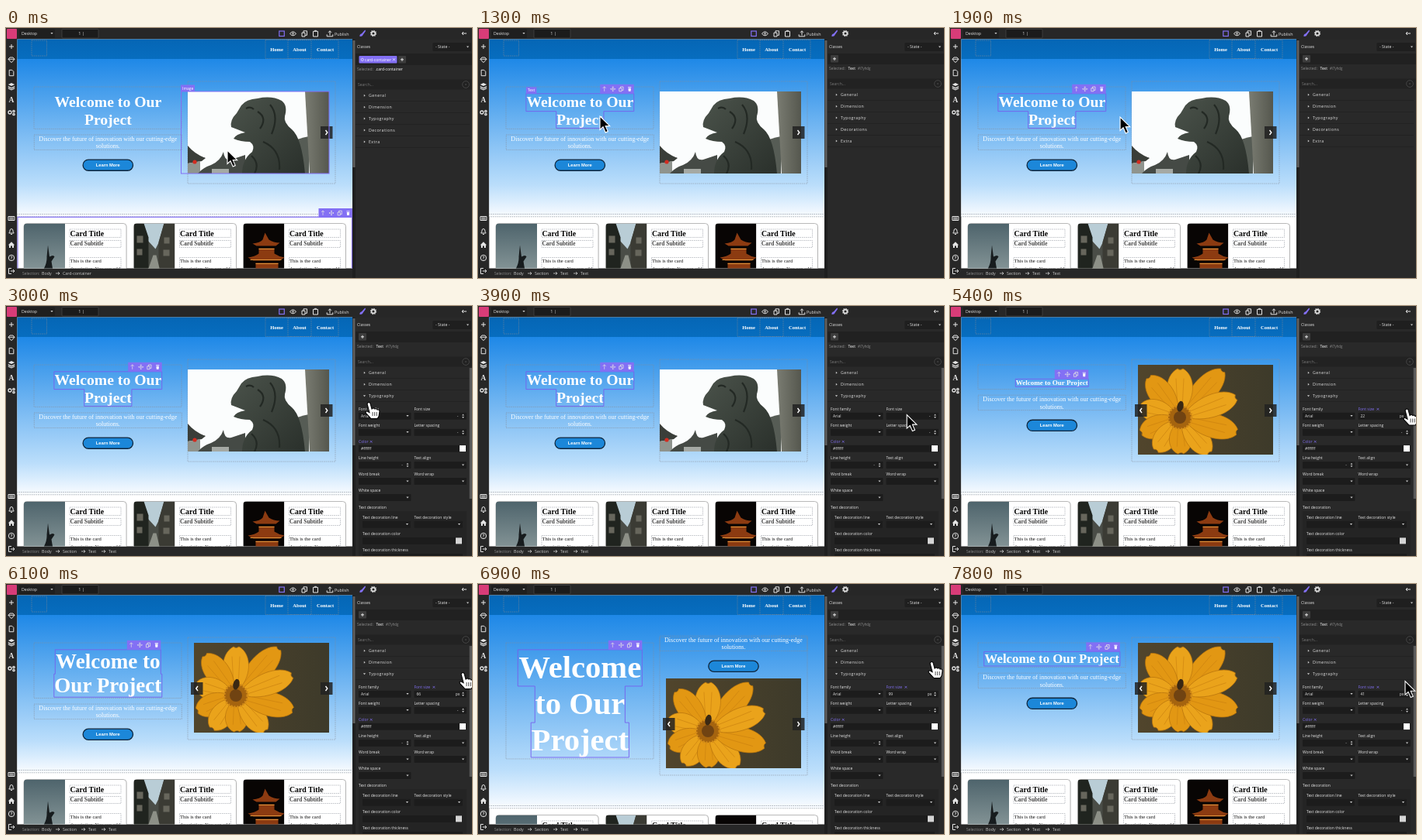
These frames come from a looping animation (600x323 px, 7.9 s). An HTML page:

```html
<!DOCTYPE html>
<html lang="en">
<head>
<meta charset="utf-8">
<title>Page builder</title>
<style>
html, body { margin: 0; width: 100%; height: 100%; overflow: hidden; background: #272727; }
svg { display: block; width: 600px; height: 323px; font-family: "Open Sans", "Noto Sans", sans-serif; }
.serif { font-family: "Liberation Serif", "Times New Roman", serif; }
.arial { font-family: "Liberation Sans", Arial, sans-serif; }
.b { font-weight: bold; }
.m { text-anchor: middle; }
.dash { fill: none; stroke: #868d96; stroke-opacity: .75; stroke-width: .7; stroke-dasharray: 1.6 1; }
.icon { fill: none; stroke: #e4e4e4; stroke-width: 1; stroke-linejoin: round; }
.acc { letter-spacing: .45px; font-weight: 500; }
</style>
</head>
<body>
<svg id="stage" viewBox="0 0 600 323"></svg>
<script>
const LOOP = 7900, STEP = 100, SELECT = 700, OPEN = 2700, DRAG = 4950, SLIDE = 5300;
const PURPLE = '#8370f4', LIGHT = '#e4e4e4', GREY = '#8b8b8b';
const SCALE = .41, BASE = 48 * SCALE, COLUMN = 190, TOP = 84.7;
const EMS = { Welcome: 3.943, to: .833, Our: 1.778, Project: 3.109 };

// Pointer stops: time, x, y
const STOPS = [
  [0, 285, 158], [100, 285, 158], [600, 157, 114], [1700, 157, 114], [2400, 470, 119],
  [2800, 467, 125], [3300, 467, 125], [4200, 582, 146], [4600, 596, 150], [4800, 596, 150],
  [DRAG, 588, 143], [6100, 588, 115], [6800, 584, 101], [6900, 584, 101],
  [7700, 586, 125.6], [LOOP, 586, 125.6]
];

const rect = (x, y, w, h, fill, more = '') =>
  `<rect x="${x}" y="${y}" width="${w}" height="${h}" fill="${fill}" ${more}/>`;
const dash = (x, y, w, h) => `<rect class="dash" x="${x}" y="${y}" width="${w}" height="${h}"/>`;
const path = (d, fill, more = '') => `<path d="${d}" fill="${fill}" ${more}/>`;
const icon = (d, x, y, more = '') => `<path class="icon" d="${d}" transform="translate(${x} ${y})" ${more}/>`;
const text = (x, y, s, size = 5, fill = LIGHT, cls = '') =>
  `<text x="${x}" y="${y}" font-size="${size}" fill="${fill}" class="${cls}">${s}</text>`;
const group = (x, y, body) => `<g transform="translate(${x} ${y})">${body}</g>`;
const down = (x, y) => path(`M${x - 1.6} ${y - .9}h3.2l-1.6 2z`, '#ccc');
const spin = (x, y) => path(`M${x - 1.4} ${y - .8}h2.8l-1.4-2zM${x - 1.4} ${y + .8}h2.8l-1.4 2z`, '#ccc');

const COPY = 'M-1 -1V-3.5H3.5V2H1.2M-3 -1.2H1V3.7H-3Z';
const MOVE = 'M-3 0H3M0 -3V3M-2 -1L-3 0L-2 1M2 -1L3 0L2 1M-1 -2L0 -3L1 -2M-1 2L0 3L1 2';
const THIN = 'style="stroke-width:.7"';

const DEFS = `<defs>
  <linearGradient id="sky" x2="0" y2="1"><stop stop-color="#1e88e7"/>
    <stop offset=".8" stop-color="#bbdefb"/><stop offset="1" stop-color="#fafcff"/></linearGradient>
  <linearGradient id="bar" x2="0" y2="1"><stop stop-color="#0566b5"/><stop offset="1" stop-color="#076dbf"/></linearGradient>
  <linearGradient id="stone" x2="1" y2="1"><stop stop-color="#4b534b"/><stop offset="1" stop-color="#2a302b"/></linearGradient>
  <linearGradient id="pillar"><stop stop-color="#7a7c72"/><stop offset="1" stop-color="#55574e"/></linearGradient>
  <linearGradient id="soil"><stop stop-color="#51452c"/><stop offset="1" stop-color="#3d3a2a"/></linearGradient>
  <linearGradient id="dusk" x2="0" y2="1"><stop stop-color="#4e646c"/><stop offset="1" stop-color="#8d9c9d"/></linearGradient>
  <clipPath id="page"><rect x="14.4" y="14.4" width="431.6" height="296.1"/></clipPath>
  <clipPath id="photo"><rect x="242" y="76" width="174" height="116"/></clipPath>
  <clipPath id="still"><rect x="234" y="82" width="182" height="106"/></clipPath>
  <clipPath id="thumb"><path d="M53 0H4Q0 0 0 4V70H53Z"/></clipPath>
</defs>`;

function pointer(t) {
  let i = 1;
  while (STOPS[i][0] < t) i++;
  const [t0, x0, y0] = STOPS[i - 1], [t1, x1, y1] = STOPS[i];
  let k = (t - t0) / (t1 - t0);
  k = k * k * (3 - 2 * k);
  return [x0 + (x1 - x0) * k, y0 + (y1 - y0) * k];
}

// Greedy line breaking, widths in em
function wrap(size) {
  const lines = [];
  for (const [word, em] of Object.entries(EMS)) {
    const last = lines[lines.length - 1];
    if (last && (last.em + .25 + em) * size <= COLUMN) {
      last.s += ' ' + word;
      last.em += .25 + em;
    } else lines.push({ s: word, em });
  }
  return lines;
}

function layout(value) {
  const size = value === null ? BASE : value * SCALE;
  const strut = Math.max(size, BASE), step = strut * 1.16;
  const lines = wrap(size);
  lines.forEach((l, i) => {
    const w = l.em * size;
    l.y = TOP + i * step + strut * .896;
    l.x0 = 131.3 - w / 2;
    l.x1 = 131.3 + w / 2;
    l.top = l.y - size * .891;
    l.end = l.y + size * .216;
  });
  const bottom = TOP + lines.length * step, split = lines.length > 2;
  return {
    size, lines, bottom, split,
    cx: split ? 329 : 131.3,
    py: split ? 75 : bottom + 15.6,
    shift: split ? 46 : Math.max(0, bottom - 149)
  };
}

function toolbar(right, bottom) {
  return group(right - 43.5, bottom - 12,
    rect(0, 0, 43.5, 12, PURPLE) +
    icon('M0 3V-3M-2 -1L0 -3L2 -1', 5.5, 6, THIN) +
    icon(MOVE, 16.5, 6, THIN) +
    group(27, 6, `<g transform="scale(.8)">${icon(COPY, 0, 0)}</g>`) +
    path('M35.9 3.4h4.2v.9h-4.2zM36.3 4.9h3.4l-.3 4h-2.8z', '#fff'));
}

const label = (x, bottom, w, s) =>
  rect(x, bottom - 8.5, w, 8.5, PURPLE) + text(x + 2, bottom - 2.3, s, 5, '#fff');

function statue() {
  return `<g clip-path="url(#still)">` + rect(234, 82, 182, 106, '#fbfdfd') +
    // Roofs behind the figure
    path('M234 152Q243 163 257 168L252 172L234 175Z', '#3a3e39') +
    path('M234 175L250 172V188H234Z', '#8f948e') +
    path('M247 188Q254 180 264 177Q276 172 280 160Q281 172 290 170L308 164V188Z', '#454a45') +
    path('M265 182h22v6h-22z', '#a5a9a4') +
    path('M364 150Q376 142 390 140V188H364Z', '#565c55') +
    path('M385 82H416V188H391Z', 'url(#pillar)') +
    path('M303 100Q309 92 324 91Q342 87 355 94Q363 100 359 114Q357 122 368 131Q381 142 385 188H304Q304 170 317 160Q321 152 314 147Q302 147 293 143Q296 137 308 135Q298 131 290 128Q288 119 297 110Z', 'url(#stone)') +
    path('M309 104Q315 101 319 105M324 108Q337 116 327 130M340 99Q352 113 342 137M331 147Q354 157 352 183M316 165Q327 175 320 188', 'none', 'stroke="#232924" stroke-width="2.2"') +
    '<circle cx="243" cy="173" r="2.6" fill="#d32c20"/></g>';
}

function flower() {
  // Petals: angle, length, half width
  const petals = [[-48, 82, 16], [-90, 63, 17], [-128, 66, 16], [-165, 53, 15], [158, 54, 15],
    [125, 53, 15], [88, 47, 15], [50, 60, 15], [14, 76, 16], [-20, 77, 15]];
  return `<g clip-path="url(#photo)">` + rect(242, 76, 174, 116, 'url(#soil)') +
    group(296, 144, petals.map(([a, l, w], i) =>
      `<g transform="rotate(${a})">` +
      path(`M4 0C${l * .35} ${-w * 1.25} ${l * .85} ${-w * 1.25} ${l} -3Q${l - 3} 0 ${l} 4C${l * .85} ${w * 1.25} ${l * .35} ${w * 1.25} 4 0Z`, i % 2 ? '#eaa31b' : '#e29713', 'stroke="#b9750d" stroke-width=".7"') +
      path(`M12 -3L${l * .8} -5M12 3L${l * .8} 5`, 'none', 'stroke="#c98010" stroke-width=".6"') + '</g>').join('') +
      '<circle r="15" fill="#a5640f"/><circle r="15" fill="none" stroke="#d58d18" stroke-width="3" stroke-dasharray="2 2"/>' +
      '<circle r="8" fill="#704312"/><ellipse cx="-3" cy="-14" rx="4" ry="7" fill="#3a2813" transform="rotate(14)"/>') + '</g>';
}

const THUMBS = [
  rect(0, 0, 53, 70, 'url(#dusk)') +
    path('M26 58Q30 50 29.5 43L31 28L33 43Q38 40 39.5 43L35.5 49L37 58L42 70H22Z', '#171c1e'),
  rect(0, 0, 53, 70, '#4a4d47') + path('M12 0H39L32 25L28 33L18 22Z', '#b9cdd6') +
    path('M0 0H13L19 18V58L0 66Z', '#20241f') + path('M53 0H39L32 24V58L53 66Z', '#3b3b34') +
    path('M19 58L25 41H29L36 70H10Z', '#8d9087') +
    path('M4 16h8v9H4zM4 33h7v8H4zM39 18h7v8h-7zM38 34h8v8h-8z', '#67665c'),
  rect(0, 0, 53, 70, '#080504') + group(0, 3,
    path('M28 9L33 18Q39 22 47 22L42 26H17L12 23Q22 22 25 18ZM20 29H40V36Q46 40 53 41L47 45H13L6 41Q15 40 20 36ZM16 48H45V55Q49 59 53 60V70H5V61Q12 60 16 55Z', '#8c3b11') +
    path('M20 30h20M16 49h29M9 44h40M9 63h44', 'none', 'stroke="#e0933a" stroke-width="1.1"'))
];

function card(x, i) {
  return group(x, 252.5,
    rect(.5, .6, 132, 80, '#777', 'rx="4" opacity=".25"') +
    rect(0, 0, 132, 80, '#fff', 'rx="4" stroke="#8a8a8a" stroke-width=".6"') +
    `<g clip-path="url(#thumb)">${THUMBS[i]}</g>` +
    dash(59, 7.5, 66, 10.5) + dash(59, 22, 66, 9) + dash(59, 44, 66, 30) +
    text(59.5, 16.2, 'Card Title', 9.84, '#000', 'serif b') +
    text(59.5, 28.5, 'Card Subtitle', 7.4, '#444', 'serif b') +
    text(59.5, 50.5, 'This is the card', 6.56, '#111', 'serif') +
    text(59.5, 60.2, 'description. You can add', 6.56, '#111', 'serif'));
}

function arrowButton(x, back) {
  return rect(x, 127, 15.5, 16, '#222', 'opacity=".85"') +
    path(back ? `M${x + 9} 132l-2.3 3l2.3 3` : `M${x + 6.5} 132l2.3 3l-2.3 3`, 'none', 'stroke="#fff" stroke-width="1.4"');
}

function outline(lines) {
  let d = `M${lines[0].x0} ${lines[0].top}`;
  lines.forEach((l, i) => {
    const end = lines[i + 1] ? lines[i + 1].top : l.end;
    d += `L${l.x1} ${l.top}L${l.x1} ${end}`;
  });
  [...lines].reverse().forEach((l, i, all) => {
    const end = i ? all[i - 1].top : l.end;
    d += `L${l.x0} ${end}L${l.x0} ${l.top}`;
  });
  return path(d + 'Z', 'none', 'stroke="#765fee" stroke-width=".9"');
}

function page(t, value, [mx, my]) {
  const { size, lines, bottom, split, cx, py, shift } = layout(value);
  const selected = t >= SELECT, slide = t >= SLIDE, imgShift = split ? 46 : 0;
  const first = lines[0], last = lines[lines.length - 1];
  const overImage = mx > 234 && mx < 416 && my > 82 && my < 188;
  const overText = mx > first.x0 && mx < first.x1 && my > first.top && my < last.end;
  let s = rect(14, 14, 432, 297, '#fff') + rect(14, 40, 432, 204 + shift, 'url(#sky)') + rect(14, 14, 432, 26, 'url(#bar)');

  s += dash(33, 16, 19.5, 20) + dash(334, 15.5, 94, 24) + dash(363, 15.5, 30, 24);
  [['Home', 348.5], ['About', 378], ['Contact', 411]].forEach(([n, x]) => s += text(x, 30.3, n, 6.56, '#fff', 'serif b m'));

  s += dash(36, 76, 190, bottom - 76) + dash(234, 69, 190, 132 + imgShift) + dash(cx - 95, py - 8, 190, 19.5);
  lines.forEach(l => s += text(131.3, l.y, l.s, size, '#fff', 'serif b m'));
  s += text(cx, py, 'Discover the future of innovation with our cutting-edge', 8.03, '#fff', 'serif m') +
    text(cx, py + 9.4, 'solutions.', 8.03, '#fff', 'serif m') +
    rect(cx - 32.2, py + 24.1, 64.4, 14.2, '#1c87d9', 'rx="7.1" stroke="#10263c" stroke-width="1.3"') +
    text(cx, py + 33.2, 'Learn More', 5.75, '#fff', 'arial b m');

  s += group(0, imgShift, (slide ? flower() + arrowButton(238, true) : statue()) + arrowButton(405, false));
  s += group(0, shift,
    path('M14 240.5H446M14 243.8H446', 'none', 'stroke="#8a929a" stroke-width=".7" stroke-dasharray="1.5 1.2"') +
    [23, 164.5, 305.5].map(card).join(''));

  if (overImage && !slide && t < SELECT) {
    s += rect(225.5, 82, 190.5, 106, 'none', `stroke="${PURPLE}" stroke-width="1"`) + label(225, 82, 18, 'Image');
  }
  if (selected) s += outline(lines) + toolbar(first.x1, first.top);
  else s += rect(15, 244.3, 430.5, 90, 'none', `stroke="${PURPLE}" stroke-width="1.2"`) + toolbar(446, 245);
  if (overText && t < 2400) s += (selected ? '' : outline(lines)) + label(first.x0, first.top, 13.5, 'Text');
  return `<g clip-path="url(#page)">${s}</g>`;
}

function chrome(t) {
  let s = rect(0, 0, 600, 323, '#272727') + rect(1, 1, 13, 13, '#d83c78', 'rx="1"');
  s += rect(17, 1.5, 46, 11.5, '#1f1f1f', 'rx="1"') + text(20, 9, 'Desktop', 5.2) + down(59, 7) +
    rect(72, 1.5, 47, 11.5, '#1b1b1b', 'rx="1" stroke="#484848" stroke-width=".7"') + text(97, 9.2, '1 |', 5.5, LIGHT, 'm');
  s += rect(351.8, 4, 6.5, 6.5, 'none', `stroke="${PURPLE}" stroke-width="1.2"`) +
    icon('M-4 0Q0 -5 4 0Q0 5 -4 0ZM-1 0A1 1 0 1 0 1 0A1 1 0 1 0 -1 0', 369.5, 7.3) + icon(COPY, 384, 7.3) +
    icon('M-3 -3H3V3.7H-3ZM-1 -3V-4H1V-3', 398.5, 7.3) +
    icon('M0 2V-3.5M-2 -1.5L0 -3.5L2 -1.5M-3.8 1V3.5H3.8V1', 417, 7.3) + text(423, 9.6, 'Publish', 5.4);
  s += path('M455.5 11Q455 8 458 7.3L462.2 2.5Q463.5 3 462.7 4.5L459.8 8.5Q459 11 455.5 11Z', PURPLE) +
    '<circle cx="473" cy="7" r="2.4" fill="none" stroke="#ddd" stroke-width="1.6"/><circle cx="473" cy="7" r="3.6" fill="none" stroke="#ddd" stroke-width="1.1" stroke-dasharray="1.4 1.4"/>' +
    icon('M3 0H-3M-1 -2L-3 0L-1 2', 590, 7);
  s += icon('M-3 0H3M0 -3V3', 7, 24) + icon('M-2 -3H2L4 -.7L0 3.7L-4 -.7ZM-4 -.7H4', 7, 41) +
    icon('M-2.8 -3.7H.8L2.8 -1.7V3.7H-2.8Z', 7, 58) +
    path('M7 71L11.2 73L7 75L2.8 73ZM2.8 75l4.2 2l4.2-2v1.4l-4.2 2l-4.2-2zM2.8 77.3l4.2 2l4.2-2v1.3l-4.2 2l-4.2-2z', '#e4e4e4') +
    text(7, 95.7, 'A', 9.5, '#e4e4e4', 'serif b m') +
    '<g fill="none" stroke="#e4e4e4" stroke-width="1.3"><circle cx="5" cy="109" r="2"/><circle cx="10" cy="107.5" r="1.2"/><circle cx="10" cy="111.5" r="1.2"/></g>';
  s += icon('M-4 -2.5H4V2.5H-4ZM-2.7 -.8H2.7M-2.7 1H2.7', 7, 246) +
    icon('M-3.2 2Q-2 1 -2 -1Q-2 -3.5 0 -3.5Q2 -3.5 2 -1Q2 1 3.2 2ZM-1 3.5H1', 7, 263) +
    path('M2.8 280.5L7 276.3L11.2 280.5H10V284H8V281.5H6V284H4V280.5Z', '#e4e4e4') +
    '<circle cx="7" cy="297" r="3.7" fill="none" stroke="#e4e4e4"/>' + text(7, 299.1, '?', 5.5, LIGHT, 'b m') +
    icon('M0 -3.5H-3.5V3.5H0M-1 0H4M2 -2L4 0L2 2', 7, 314);

  s += rect(446, 15, 4, 308, '#1f1f1f') + rect(446.5, 16, 3, 164, '#606060');
  const crumbs = t < SELECT ? [['Body', 46], ['Card-container', 73]] : [['Body', 46], ['Section', 73], ['Text', 106], ['Text', 132]];
  s += text(21, 318.7, 'Selection:', 5, GREY);
  crumbs.forEach(([n, x], i) => {
    s += text(x, 318.7, n, 5.3, '#c8c8c8');
    if (i) s += icon('M-3 0H2M0 -1.8L2 0L0 1.8', x - 6, 317, THIN);
  });
  return s;
}

function field(x, y, w, name, kind, value = '', on = false) {
  const right = x + w;
  let s = text(x, y, name, 5, on ? PURPLE : LIGHT) + rect(x, y + 2.7, w, 9, '#1c1c1c', 'rx=".8"') +
    text(x + 3, y + 9.1, value, 5);
  if (on) {
    const cx = x + name.length * 2.3 + 4.7;
    s += path(`M${cx - 1.4} ${y - 3.1}l2.8 2.8m0 -2.8l-2.8 2.8`, 'none', `stroke="${PURPLE}" stroke-width=".7"`);
  }
  if (kind === 'list') s += down(right - 4.5, y + 7);
  if (kind === 'color') s += rect(right - 9, y + 3.1, 8, 8, value ? '#fff' : '#d5d5d5');
  if (kind === 'number') s += text(right - 11.5, y + 9.1, on ? 'px' : '-', 5, LIGHT, 'm') + spin(right - 4.5, y + 7.2);
  return s;
}

function typography(value) {
  const on = value !== null;
  return field(454, 135, 67.5, 'Font family', 'list', 'Arial') +
    field(525.5, 135, 67.5, 'Font size', 'number', on ? value : '', on) +
    field(454, 156, 67.5, 'Font weight', 'list') + field(525.5, 156, 67.5, 'Letter spacing', 'number') +
    field(454, 177, 139, 'Color', 'color', '#ffffff', true) +
    field(454, 198.3, 67.5, 'Line height', 'number') + field(525.5, 198.3, 67.5, 'Text align', 'list') +
    field(454, 219.3, 67.5, 'Word break', 'list') + field(525.5, 219.3, 67.5, 'Word wrap', 'list') +
    field(454, 240.3, 67.5, 'White space', 'list') + text(454, 261.5, 'Text decoration') +
    rect(454, 265, 139, 60, '#242424') +
    field(459, 275, 62, 'Text decoration line', 'list') + field(525.5, 275, 62.5, 'Text decoration style', 'list') +
    field(459, 296.3, 129, 'Text decoration color', 'color') + field(459, 317.2, 129, 'Text decoration thickness', '') +
    rect(596.7, 80, 3.3, 169, '#5a5a5a');
}

function panel(t, value) {
  const selected = t >= SELECT, open = t >= OPEN, dy = selected ? 0 : 1;
  let s = rect(450, 15, 150, 308, '#292929') + text(452, 26.2, 'Classes', 5) +
    rect(549.5, 19, 49.5, 11, '#1f1f1f', 'rx="1"') + text(553, 26.2, '- State -', 5.2) + down(594.5, 24.5) +
    rect(450, 33, 150, 14 + dy, '#212121');
  if (selected) s += rect(454, 35, 10, 9.5, '#3c3c3c', 'rx="1"') + icon('M-2 0H2M0 -2V2', 459, 39.8);
  else {
    s += rect(454.5, 36, 49, 9.5, PURPLE, 'rx="1"') +
      '<circle cx="458.8" cy="40.8" r="1.6" fill="none" stroke="#fff" stroke-width=".6"/>' + text(462, 42.6, 'card-container', 5, '#fff') +
      path('M498 39.2l3 3m0 -3l-3 3', 'none', 'stroke="#fff" stroke-width=".7"') +
      rect(505, 36, 10, 9.5, '#3c3c3c', 'rx="1"') + icon('M-2 0H2M0 -2V2', 510, 40.8);
  }
  const y = 54 + dy;
  s += text(452, y, 'Selected:', 5, GREY) +
    (selected ? text(476.5, y, 'Text', 5, '#fff') + text(489, y, '#i7yhdg', 4.4, GREY) : text(475.5, y, '.card-container', 5, '#fff'));
  s += rect(450, 65.5 + dy, 150, 13, '#222') + text(453, 73.8 + dy, 'Search...', 5, '#777') +
    `<circle cx="592" cy="${72 + dy}" r="4.4" fill="none" stroke="#585858" stroke-width=".6"/>` + text(592, 73.4 + dy, 'x', 4, '#666', 'm');

  const rows = ['General', 'Dimension', 'Typography', 'Decorations', 'Extra'];
  rows.slice(0, open ? 3 : 5).forEach((n, i) => {
    const ry = 86.3 + dy + i * 14.9, turned = open && i === 2;
    s += rect(450, ry + 7, 147, .7, '#202020') + text(467, ry + 1.9, n, 5.2, LIGHT, 'acc') +
      (turned ? down(461.5, ry) : path(`M460.8 ${ry - 1.5}v3l1.9-1.5z`, '#ccc'));
  });
  return s + (open ? typography(value) : '');
}

const CURSORS = {
  arrow: path('M0 0V17.5L4 13.8L7.2 21L10.3 19.6L7.2 12.6H12.7Z', '#000', 'stroke="#fff" stroke-width="1.1"'),
  hand: path('M-2 1.3Q0 -2 2 .7L4 8Q6 6 7.8 8Q10 6.8 11 9Q13.6 8.3 14 11L13 17.5L11.2 20.5H3L-3.4 13.6Q-5 10.8 -2 11L1 12.6Z', '#fff', 'stroke="#000" stroke-width="1.1"') +
    path('M5 12v5M7.7 12v5M10.3 12v5', 'none', 'stroke="#000" stroke-width=".7"'),
  resize: path('M0 -9.5L5.6 -3.5H2V3.5H5.6L0 9.5L-5.6 3.5H-2V-3.5H-5.6Z', '#fff', 'stroke="#000" stroke-width="1"')
};

function cursor(t, [x, y]) {
  const hand = (t >= 2300 && t < 3400) || (t >= 5000 && t < 7700);
  const name = hand ? 'hand' : t >= 4500 && t < 5000 ? 'resize' : 'arrow';
  return group(x, y, CURSORS[name]);
}

const stage = document.getElementById('stage'), start = performance.now();
let shown = -1;

function draw(now) {
  const t = Math.floor(Math.max(0, now - start) % LOOP / STEP) * STEP;
  if (t !== shown) {
    shown = t;
    const at = pointer(t);
    const value = t < DRAG ? null : Math.max(0, Math.round((143 - at[1]) * 2.36));
    stage.innerHTML = DEFS + chrome(t) + page(t, value, at) + panel(t, value) + cursor(t, at);
  }
  requestAnimationFrame(draw);
}
draw(start);
</script>
</body>
</html>
```
